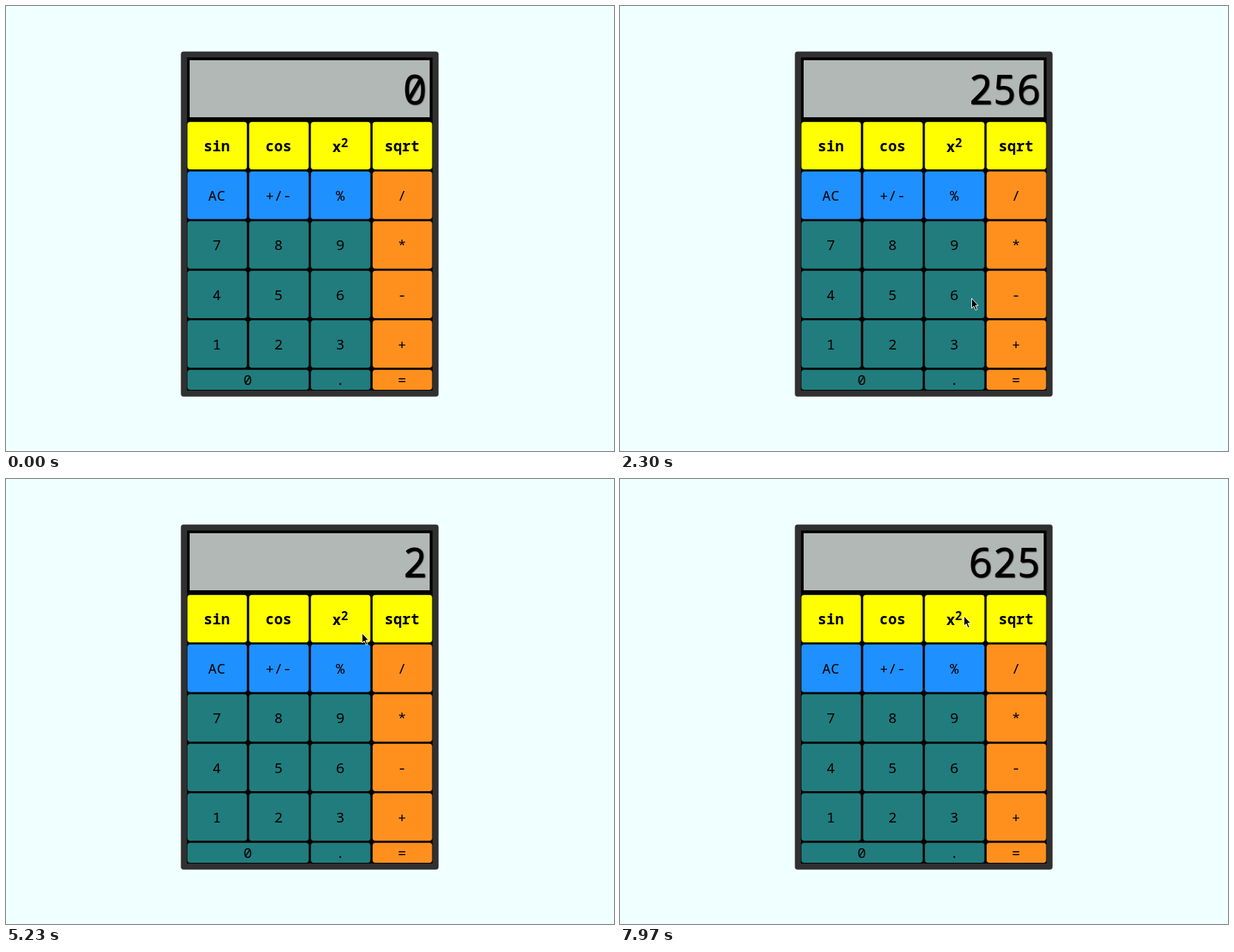
An HTML page with a canvas that plays this animation: 874 by 640 pixels, repeating every 8000 ms.

```html
<!DOCTYPE html>
<html lang="en">
<head>
<meta charset="utf-8">
<title>Calculator</title>
<style>
  html, body { margin: 0; width: 874px; height: 640px; overflow: hidden; background: #f0ffff; }
  canvas { display: block; }
</style>
</head>
<body>
<canvas id="stage" width="874" height="640"></canvas>
<script>
const LOOP = 8000, ENTER = 190, HOLD = 60;
const ctx = document.getElementById("stage").getContext("2d");
const arrow = new Path2D("M.5 .5V14.6L3.7 11.7L6.2 17.5L8.5 16.5L6 10.8H10Z");
const FONT = '"Noto Sans Mono", "DejaVu Sans Mono", monospace';
const SIZE = 20.8, PITCH_X = 88.75, PITCH_Y = 71.3, KEY_W = 85.5, KEY_H = 68.3;

const layout = ["sin cos x2 sqrt", "AC +/- % /", "7 8 9 *", "4 5 6 -", "1 2 3 +", "0 0 . ="]
  .map(line => line.split(" "));

// Pointer stops: move start, move end, x, y, key clicked on arrival
const stops = [
  [ENTER, ENTER, 766, 598],
  [ENTER, 490, 239, 47],
  [490, 1380, 421, 484, "2"],
  [1390, 1780, 411, 408, "5"],
  [1840, 2220, 505, 420, "6"],
  [2300, 3060, 573, 204.5, "sqrt"],
  [3750, 3780, 563, 197],
  [3780, 3920, 563, 197, "sqrt"],
  [3920, 4350, 563, 197, "sqrt"],
  [4350, 4620, 456, 248],
  [4620, 4930, 512, 221],
  [5220, 5560, 303, 278, "AC"],
  [5620, 6120, 410.5, 479],
  [6790, 7050, 410.5, 479, "2"],
  [7080, 7390, 400, 408, "5"],
  [7410, 7820, 494, 196.5, "x2"]
];

const actions = {
  AC: () => "0",
  sqrt: n => String(Math.sqrt(n)),
  x2: n => String(n * n)
};

function result(t) {
  return stops.filter(([, end, , , key]) => key && end <= t).reduce((shown, stop) => {
    const key = stop[4], action = actions[key];
    if (action) return action(Number(shown));
    return shown === "0" ? key : shown + key;
  }, "0");
}

function pointerAt(t) {
  let [, , x, y] = stops[0];
  for (const [from, to, toX, toY] of stops.slice(1)) {
    if (t <= from) break;
    const u = Math.min(1, (t - from) / (to - from));
    const e = u * u * (3 - 2 * u);
    x += (toX - x) * e;
    y += (toY - y) * e;
  }
  return [x, y];
}

function box(color, x, y, w, h, radius = 0) {
  ctx.fillStyle = color;
  ctx.beginPath();
  ctx.roundRect(x, y, w, h, radius);
  ctx.fill();
}

function write(text, x, y, size, weight = "normal", align = "center") {
  ctx.font = `${weight} ${size}px ${FONT}`;
  ctx.textAlign = align;
  ctx.fillStyle = "#000";
  ctx.fillText(text, x, y);
}

function colorOf(row, col) {
  if (row === 0) return "#ffff00";
  if (col === 3) return "#ff901e";
  return row === 1 ? "#1e90ff" : "#217c7e";
}

function drawKey(label, row, col, held) {
  const x = 260.8 + col * PITCH_X, y = 166.8 + row * PITCH_Y;
  const w = label === "0" ? KEY_W + PITCH_X : KEY_W;
  const h = row === 5 ? 28.7 : KEY_H;
  ctx.globalAlpha = held ? 0.8 : 1;
  box(colorOf(row, col), x, y, w, h, 4);
  ctx.globalAlpha = 1;

  const cx = x + w / 2 - 0.5, base = y + h / 2 + 7.8;
  const weight = row === 0 ? "bold" : "normal";
  if (label === "x2") {
    write("x", cx - 5.2, base + 1.6, SIZE, weight);
    write("2", cx + 6.2, base - 5.3, SIZE * 0.83, weight);
  } else {
    write(label, cx, base, SIZE, weight);
  }
}

function drawScreen(text) {
  box("#b2b8b6", 264, 78, 345, 82);
  ctx.save();
  ctx.shadowColor = "#000";
  ctx.shadowOffsetX = ctx.shadowOffsetY = 1;
  ctx.shadowBlur = 1.5;
  write(text, 604.7, 141, 57.6, "normal", "right");
  ctx.restore();
}

function drawPointer(t) {
  ctx.save();
  ctx.translate(...pointerAt(t));
  ctx.fillStyle = "#000";
  ctx.strokeStyle = "#fff";
  ctx.fill(arrow);
  ctx.stroke(arrow);
  ctx.restore();
}

function draw(t) {
  box("#f0ffff", 0, 0, 874, 640);
  box("#303030", 251.4, 65.5, 370.4, 496.2, 4);
  box("#000", 260.2, 74, 353, 479);
  drawScreen(result(t));

  const click = stops.find(([, end, , , key]) => key && t >= end - HOLD && t < end);
  layout.forEach((labels, row) => labels.forEach((label, col) => {
    if (label === "0" && col === 1) return;
    drawKey(label, row, col, row > 0 && click && click[4] === label);
  }));

  if (t >= ENTER) drawPointer(t);
}

const start = performance.now();
function tick() {
  draw((performance.now() - start) % LOOP);
  requestAnimationFrame(tick);
}
draw(0);
requestAnimationFrame(tick);
</script>
</body>
</html>
```
